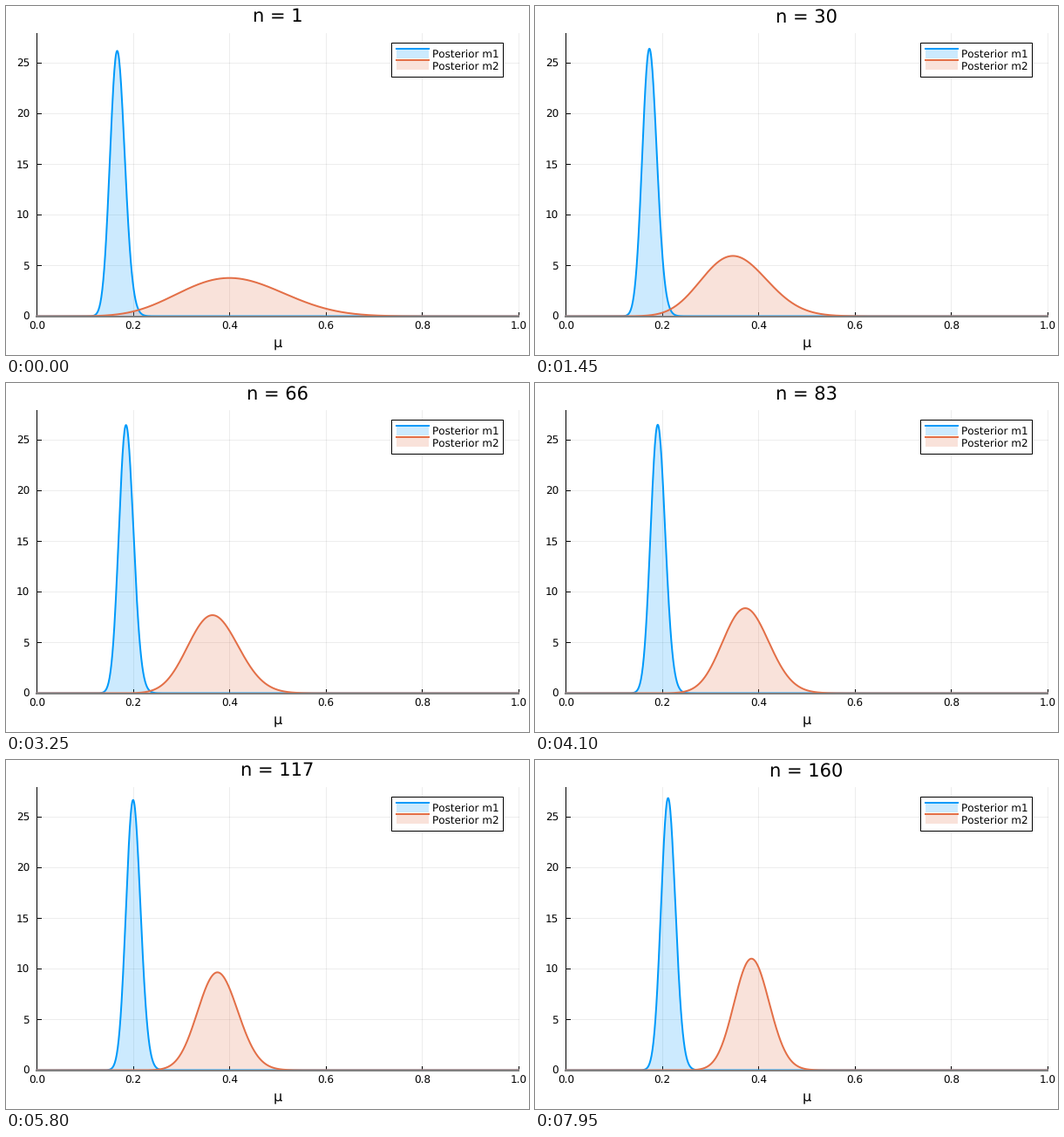
Recreate the animation shown at these times as a matplotlib script. Size 600x400 px, loop 8000 ms.

```python
import math

import numpy as np
import matplotlib.pyplot as plt
from matplotlib.animation import FuncAnimation
from matplotlib.patches import Rectangle

W, H, DPI = 600, 400, 100
FRAMES, INTERVAL = 160, 50
X0, X1 = 35.3, 588.0
Y0, Y1 = 355.5, 30.5
Y_MAX = 28
BLUE, ORANGE = "#009afa", "#e36f47"
PRIORS = ((100, 500), (8, 13))

# Number of heads among the first n coin tosses, between a few known counts
TOSSES = [1, 8, 18, 24, 34, 39, 43, 52, 66, 69, 74, 86, 100, 119, 135, 136, 154, 160]
HEADS = [1, 1, 4, 8, 12, 14, 15, 17, 24, 25, 29, 31, 38, 45, 51, 52, 58, 62]

plt.rcParams["font.family"] = "DejaVu Sans"
plt.rcParams["text.hinting"] = "none"
plt.rcParams["text.hinting_factor"] = 1


def px(v):
    """Pixels to points."""
    return v * 72 / DPI


def sx(mu):
    return X0 + (X1 - X0) * mu


def sy(density):
    return Y0 - (Y0 - Y1) * density / Y_MAX


def beta_pdf(mu, a, b):
    norm = math.lgamma(a + b) - math.lgamma(a) - math.lgamma(b)
    return np.exp(norm + (a - 1) * np.log(mu) + (b - 1) * np.log(1 - mu))


def heads(n):
    return int(np.interp(n, TOSSES, HEADS) + 0.5)


fig = plt.figure(figsize=(W / DPI, H / DPI), dpi=DPI, facecolor="white")
ax = fig.add_axes([0, 0, 1, 1])
ax.set_xlim(0, W)
ax.set_ylim(H, 0)
ax.axis("off")


def line(xs, ys, color="black", width=1.0, z=3, **kw):
    return ax.plot(xs, ys, color=color, lw=px(width), zorder=z, **kw)[0]


def label(x, y, text, size, ha="center"):
    return ax.text(x, y, text, fontsize=px(size), ha=ha, va="baseline", zorder=8)


def draw_axes():
    for i in range(6):
        x = sx(i / 5)
        line([x, x], [Y0, Y1], width=0.7, z=1, alpha=0.1)
        line([x, x], [Y0, Y0 - 5])
        label(x, 371.2, f"{i / 5:.1f}", 11.8)
        if i * 5 < Y_MAX:
            y = sy(i * 5)
            line([X0, X1], [y, y], width=0.7, z=1, alpha=0.1)
            line([X0, X0 + 5], [y, y])
            label(27, y + 4.3, str(i * 5), 11.8, "right")
    line([X0, X0], [Y0, Y1])
    line([X0, X1], [Y0, Y0])
    label((X0 + X1) / 2, 391.5, "μ", 16.2)


def draw_legend():
    ax.add_patch(Rectangle((441.5, 41.5), 128.5, 39, fc="white", ec="black",
                           lw=px(1), zorder=6))
    for y, color, name in ((49.3, BLUE, "m1"), (62.4, ORANGE, "m2")):
        ax.add_patch(Rectangle((447.5, y), 37, 10.5, fc=color, ec="none",
                               alpha=0.2, zorder=7))
        line([447.5, 484.5], [y, y], color, 2, 7)
        label(489, y + 10, f"Posterior {name}", 11.8, "left")


draw_axes()
draw_legend()
title = label((X0 + X1) / 2, 18.3, "", 20.6)

mu = np.linspace(1e-6, 1 - 1e-6, 1001)
curves = []
for color in (BLUE, ORANGE):
    area = ax.fill([0], [0], fc=color, ec="none", alpha=0.2, zorder=4)[0]
    curves.append((area, line([], [], color, 2, 5)))
line([X0, X1], [Y0, Y0], "#808080", 2, 5.5)


def update(i):
    n = i + 1
    k = heads(n)
    title.set_text(f"n = {n}")
    xs = sx(mu)
    for (a, b), (area, curve) in zip(PRIORS, curves):
        ys = sy(beta_pdf(mu, a + k, b + n - k))
        curve.set_data(xs, ys)
        outline = np.column_stack([xs, ys])
        area.set_xy(np.vstack([outline, [X1, Y0], [X0, Y0]]))
    return [title] + [part for pair in curves for part in pair]


anim = FuncAnimation(fig, update, frames=FRAMES, interval=INTERVAL,
                     init_func=lambda: update(0), repeat=True, repeat_delay=0)
plt.show()
```
